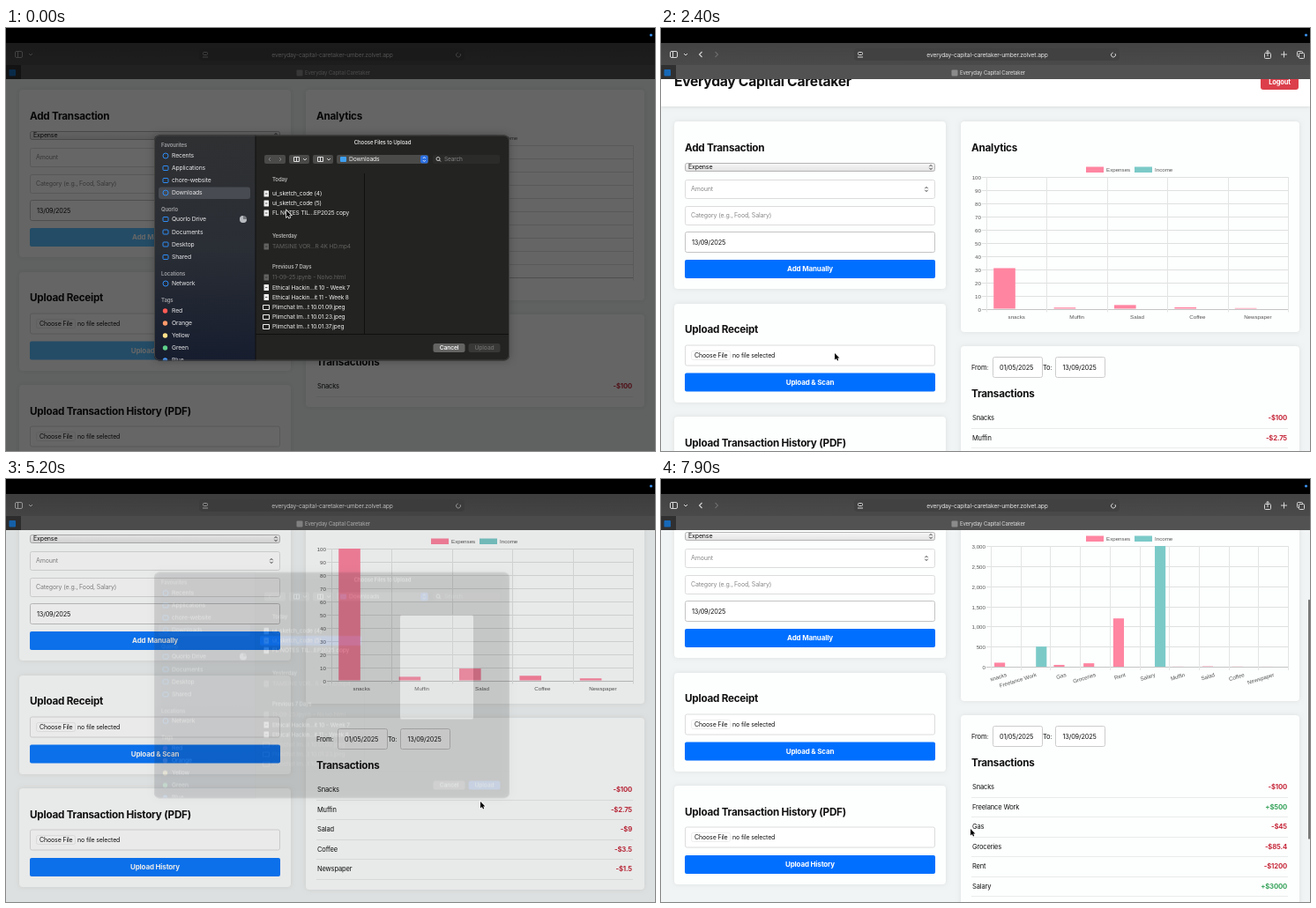
An HTML page with a canvas that plays this animation: 736x480 px, repeating every 8 s.

```html
<!DOCTYPE html>
<html lang="en">
<head>
<meta charset="utf-8">
<title>Budget page</title>
<style>
html, body { margin: 0; width: 100%; height: 100%; overflow: hidden; background: #000; }
canvas { display: block; }
</style>
</head>
<body>
<canvas id="stage" width="736" height="480"></canvas>
<script>
const W = 736, H = 480, LOOP = 8000;
const APP = 'Everyday Capital Caretaker';
const PINK = '#ff85a1', TEAL = '#7bcac8', MAC = '#2f8cf5';
const stage = document.getElementById('stage').getContext('2d');
const sheet = Object.assign(document.createElement('canvas'), { width: W, height: H }).getContext('2d');
let g = stage, accent;

// Data
const first = [['snacks', -100]];
const scanned = [['Muffin', -2.75], ['Salad', -9], ['Coffee', -3.5], ['Newspaper', -1.5]];
const history = [['Freelance Work', 500], ['Gas', -45], ['Groceries', -85.4], ['Rent', -1200], ['Salary', 3000]];
const phases = [
  { start: -2000, rows: first, x0: 369, base: 282.5, max: 100, step: 10 },
  { start: 2357, rows: [...first, ...scanned], x0: 369, base: 282.5, max: 100, step: 10 },
  { start: 6300, rows: [...first, ...history, ...scanned], x0: 374, base: 270, max: 3000, step: 500 }
];
const files = [
  [188, 'ui_sketch_code (4)'], [199, 'ui_sketch_code (5)'], [210, 'FL NOTES TIL...EP2025 copy'],
  [248, 'TAMSINE VOR...R 4K HD.mp4', 'off'], [283, '11-09-25.ipynb - Nolvo.html', 'off'],
  [294.5, 'Ethical Hackin...it 10 - Week 7'], [305.5, 'Ethical Hackin...it 11 - Week 8'],
  [317, 'Plimchat Im...t 10.01.09.jpeg', 'img'], [328, 'Plimchat Im...t 10.01.23.jpeg', 'img'],
  [339, 'Plimchat Im...t 10.01.37.jpeg', 'img']
];
const places = [
  [145, 'Recents', 'round'], [159, 'Applications'], [173, 'chore-website'], [187, 'Downloads', 'round'],
  [217, 'Quorlo Drive'], [231.5, 'Documents'], [245.5, 'Desktop'], [260, 'Shared'], [290, 'Network', 'round']
];
const tags = [['Red', '#ff5a55'], ['Orange', '#ff9a6a'], ['Yellow', '#ffe08a'], ['Green', '#5fd08a'], ['Blue', '#4a9cff']];

// Motion: [time, values...]
const pointerPath = [
  [0, 318, 207], [300, 318, 185], [430, 318, 185], [780, 534, 364], [1050, 534, 364], [1850, 162, 368],
  [2150, 162, 368], [2350, 197, 369], [2900, 197, 369], [3600, 62, 409], [3950, 62, 409], [4300, 318, 196],
  [4500, 318, 196], [4950, 538, 366], [5400, 538, 366], [5900, 168, 436], [6250, 168, 436],
  [6900, 351, 372], [7100, 351, 372], [7900, 351, 397]
];
const scrollPath = [
  [0, 0], [2080, 0], [2340, 36], [2800, 36], [3550, -54], [6450, -54], [6950, 35], [7000, 35], [7900, -57]
];

const clamp = v => Math.max(0, Math.min(1, v));
function track(keys, t) {
  const i = keys.findIndex(k => k[0] > t);
  if (i < 0) return keys[keys.length - 1];
  const a = keys[i - 1], b = keys[i], u = (t - a[0]) / (b[0] - a[0]);
  return a.map((v, j) => v + (b[j] - v) * u * u * (3 - 2 * u));
}

// Drawing helpers
function text(s, x, y, size, color = '#111', { weight = 400, align = 'left', family = 'Inter' } = {}) {
  g.font = `${weight} ${size}px ${family}, sans-serif`;
  g.letterSpacing = family === 'Inter' ? -0.02 * size + 'px' : '0px';
  g.textAlign = align;
  g.textBaseline = 'middle';
  g.fillStyle = color;
  g.fillText(s, x, y + 0.3);
}
const plain = (s, x, y, align) => text(s, x, y, 6.2, '#555', { align, family: 'Liberation Sans' });
function box(x, y, w, h, fill, r = 0, border) {
  g.beginPath();
  g.roundRect(x, y, w, h, r);
  if (fill) { g.fillStyle = fill; g.fill(); }
  if (border) { g.strokeStyle = border; g.lineWidth = 1; g.stroke(); }
}
function line(color, width, ...p) {
  g.beginPath();
  for (let i = 0; i < p.length; i += 2) g.lineTo(p[i], p[i + 1]);
  g.strokeStyle = color;
  g.lineWidth = width;
  g.stroke();
}
function dot(x, y, r, color, from = 0, to = 7) {
  g.beginPath();
  g.moveTo(x, y);
  g.arc(x, y, r, from, to);
  g.fillStyle = color;
  g.fill();
}
function ring(x, y, r, color, from = 0, to = 7) {
  g.beginPath();
  g.arc(x, y, r, from, to);
  g.strokeStyle = color;
  g.lineWidth = 1;
  g.stroke();
}
function card(x, y, w, h) {
  g.shadowColor = 'rgba(0,0,0,.08)';
  g.shadowBlur = 5;
  box(x, y, w, h, '#fdfefe', 4);
  g.shadowBlur = 0;
  g.shadowColor = 'transparent';
}
const field = (x, y, w, h, border = '#dcdcdc') => box(x + .5, y + .5, w - 1, h - 1, '#fff', 2, border);
const heading = (s, x, y) => text(s, x, y, 11.7, '#111', { weight: 700 });
function button(s, y) {
  box(27, y, 284, 21, accent, 2);
  text(s, 169, y + 10.5, 8, '#fff', { weight: 700, align: 'center' });
}
function stepper(x, y) {
  line('#333', .9, x - 1.6, y - .8, x, y - 2.6, x + 1.6, y - .8);
  line('#333', .9, x - 1.6, y + .8, x, y + 2.6, x + 1.6, y + .8);
}
function filePicker(y, name) {
  field(27, y - 12, 284, 24);
  box(34.5, y - 5, 44, 10, '#fff', 2, '#eee');
  text('Choose File', 38, y, 7);
  if (name) box(85, y - 2.5, 4, 5, '#777');
  text(name || 'no file selected', name ? 94 : 81, y, 7);
}

function drawChart(phase, t) {
  const { rows, x0, base, max, step } = phase, top = 133, right = 711, n = rows.length;
  const grow = 1 - (1 - clamp((t - phase.start) / 500)) ** 4;
  const slot = (right - x0) / n, height = base - top;
  box(482, 121.5, 20, 6.5, PINK);
  plain('Expenses', 505, 125);
  box(537, 121.5, 20, 6.5, TEAL);
  plain('Income', 560, 125);
  for (let v = 0; v <= max; v += step) {
    const y = Math.round(base - v / max * height) + .5;
    line(v ? '#dfe0e0' : '#c4c4c4', 1, x0 - 5, y, right, y);
    plain(v.toLocaleString('en-US'), x0 - 6, y, 'right');
  }
  for (let i = 0; i <= n; i++) {
    const x = Math.round(x0 + i * slot) + .5;
    line('#e3e4e4', 1, x, top, x, base + 4);
  }
  rows.forEach(([name, v], i) => {
    const mid = x0 + (i + .5) * slot, h = Math.abs(v) / max * height * grow;
    box(v < 0 ? mid - slot * .38 : mid + slot * .02, base - h, slot * .36, h, v < 0 ? PINK : TEAL);
    if (n < 8) return plain(name, mid, base + 9.5, 'center');
    g.save();
    g.translate(mid + 1, base + 9);
    g.rotate(-.3);
    plain(name, 0, 0, 'right');
    g.restore();
  });
}

function drawPage(t) {
  const phase = phases.findLast(p => t >= p.start), scroll = track(scrollPath, t)[1];
  const rows = phase.rows;
  g.save();
  g.beginPath();
  g.rect(0, 58, W, H - 58);
  g.clip();
  box(0, 58, W, H, '#f1f4f4');
  g.translate(0, scroll);

  g.shadowColor = 'rgba(0,0,0,.15)';
  g.shadowBlur = 4;
  box(0, -20, W, 73, '#fff');
  g.shadowBlur = 0;
  text(APP, 15, 25, 15.7, '#111', { weight: 700 });
  box(680, 17, 43, 17, '#dc3f4b', 3);
  text('Logout', 701.5, 25.5, 7.5, '#fff', { weight: 700, align: 'center' });

  card(15, 70, 308, 190);
  heading('Add Transaction', 27, 100);
  const shade = g.createLinearGradient(0, 117, 0, 127);
  shade.addColorStop(0, '#f8f8f8');
  shade.addColorStop(1, '#e2e2e2');
  box(27.5, 117.5, 283, 9, shade, 2, '#b4b4b4');
  text('Expense', 31, 122, 7);
  stepper(306, 122);
  field(27, 136, 284, 22);
  text('Amount', 34, 147, 7, '#888');
  stepper(301, 147);
  field(27, 166, 284, 22);
  text('Category (e.g., Food, Salary)', 34, 177, 7, '#888');
  field(27, 195, 284, 24, '#c4c4c4');
  text('13/09/2025', 35, 207.5, 7.3);
  button('Add Manually', 227);

  card(15, 277, 308, 112);
  heading('Upload Receipt', 27, 306.5);
  filePicker(335.5, t > 850 && t < 2250 && 'ui_sketch_code (4)');
  button('Upload & Scan', 355.5);

  card(15, 405, 308, 112);
  heading('Upload Transaction History (PDF)', 27, 435);
  filePicker(463.5, t > 5250 && t < 6300 && 'ui_sketch_code (5)');
  button('Upload History', 484);

  card(340, 70, 384, 239);
  heading('Analytics', 352, 100);
  drawChart(phase, t);

  card(340, 325, 384, 105 + 22.5 * (rows.length - 1));
  text('From:', 352, 349, 7.5);
  field(376, 337, 57, 24, '#ccc');
  text('01/05/2025', 384, 349.5, 7.3);
  text('To:', 433, 349, 7.5);
  field(447, 337, 57, 24, '#ccc');
  text('13/09/2025', 455.5, 349.5, 7.3);
  heading('Transactions', 352, 379);
  rows.forEach(([name, v], i) => {
    const y = 406.5 + i * 22.5;
    text(name[0].toUpperCase() + name.slice(1), 353, y, 7.5);
    text(`${v < 0 ? '-' : '+'}$${Math.abs(v)}`, 710, y, 7.7, v < 0 ? '#c6283a' : '#36a35a',
      { weight: 700, align: 'right' });
    line('#eaecec', 1, 352, Math.round(y + 11) + .5, 711, Math.round(y + 11) + .5);
  });
  g.restore();
  if (t > 6450) box(734, 75 + (35 - scroll) * .67, 2, 272, '#777', 1);
}

function drawBrowser(focused) {
  box(0, 0, W, 17, '#000');
  dot(731.5, 8, 1.6, '#3a8ee8');
  const bar = g.createLinearGradient(0, 17, 0, 42);
  bar.addColorStop(0, '#434344');
  bar.addColorStop(1, '#4a4a4b');
  box(0, 17, W, 25, bar);
  box(219, 23, 301, 14, '#414142', 4);
  box(0, 42, W, 16, '#525253');
  box(0, 42, 17, 16, '#303031');
  box(3.5, 47, 7.5, 7.5, '#1769b8', 1);
  const ink = focused ? '#d8d8d8' : '#a2a2a2';
  box(10.5, 26.5, 8, 7, null, 1.5, ink);
  line(ink, 1, 13.5, 27, 13.5, 33);
  line(ink, 1, 26, 29, 28, 31, 30, 29);
  box(223.5, 27.5, 5, 3, null, 1, ink);
  line(ink, 1, 223, 33, 229, 33);
  text('everyday-capital-caretaker-umber.zolvet.app', 370, 30.5, 6.7, focused ? '#e4e4e4' : '#ccc', { align: 'center' });
  ring(513, 30.5, 2.5, ink, -.6, 4.6);
  box(329.5, 47.5, 7, 7, '#8b8b8c', 1);
  text(APP, 339, 51, 6, focused ? '#ddd' : '#bbb');
  if (!focused) return;
  line(ink, 1.1, 46.5, 27, 43.5, 30, 46.5, 33);
  line('#6c6c6c', 1.1, 61.5, 27, 64.5, 30, 61.5, 33);
  box(684.5, 28.5, 7, 6, null, 1, ink);
  line(ink, 1, 688, 32, 688, 25.5);
  line(ink, 1, 686, 27.5, 688, 25.5, 690, 27.5);
  line(ink, 1, 703, 30, 710, 30);
  line(ink, 1, 706.5, 26.5, 706.5, 33.5);
  box(721.5, 26.5, 6, 6, null, 1, ink);
  box(723.5, 28.5, 6, 6, '#484849', 1, ink);
}

function drawSheet(active, imagesOff, picked) {
  g.clearRect(0, 0, W, H);
  g.save();
  g.beginPath();
  g.roundRect(168, 121.5, 403, 256, 6);
  g.clip();
  box(168, 121, 403, 257, '#232321');
  const side = g.createLinearGradient(0, 122, 0, 377);
  side.addColorStop(0, '#2f3032');
  side.addColorStop(.5, '#2a2e35');
  side.addColorStop(1, '#161d2e');
  box(168, 121, 115, 257, side);
  box(173, 180.5, 104, 13.5, active ? '#484b51' : '#39465c', 3);

  g.globalAlpha = active ? 1 : .45;
  for (const [y, s] of [[133, 'Favourites'], [206, 'Quorlo'], [279, 'Locations'], [309, 'Tags']])
    text(s, 176, y, 6, '#a0a1a4', { weight: 600 });
  for (const [y, s, shape] of places) {
    if (shape) ring(181, y, 3, MAC);
    else box(178, y - 2.5, 6, 5, null, 1, MAC);
    text(s, 188, y, 6.8, '#e6e6e8');
  }
  tags.forEach(([s, color], i) => {
    dot(180.5, 321 + i * 14, 2.7, color);
    text(s, 188, 321 + i * 14, 6.8, '#e6e6e8');
  });
  g.globalAlpha = 1;
  dot(269, 217, 4, active ? '#777b80' : '#ddd');
  if (active) dot(269, 217, 4, '#b8bbc0', 0, 4.7);

  line('#101010', 1, 283, 121, 283, 378);
  text('Choose Files to Upload', 427, 130, 6.1, '#eee', { weight: 500, align: 'center' });
  box(293, 144, 24, 10, '#4a4a49', 2);
  line('#888', .9, 300, 147, 298, 149, 300, 151);
  line('#888', .9, 310, 147, 312, 149, 310, 151);
  for (const x of [321, 348]) {
    box(x, 144, 23, 10, '#4a4a49', 2);
    box(x + 5.5, 146.5, 6, 5, null, 0, '#ddd');
    line('#ddd', 1, x + 8.5, 146.5, x + 8.5, 151.5);
    line('#ddd', .9, x + 16, 148, x + 18, 150, x + 20, 148);
  }
  box(375, 144, 104, 10, '#4a4a49', 2);
  box(379, 146, 7, 6, '#3fa0f0', 1);
  text('Downloads', 389, 149, 6.8, '#eee');
  if (active) box(470, 144.5, 8.5, 9, '#2b6fe0', 2);
  line('#fff', .8, 472.8, 148, 474.3, 146.5, 475.8, 148);
  line('#fff', .8, 472.8, 150, 474.3, 151.5, 475.8, 150);
  box(484, 144, 76, 10, '#2b2b2a', 2);
  ring(490, 148.5, 2, '#ccc');
  line('#ccc', 1, 491.5, 150, 493, 151.5);
  text('Search', 497, 149, 6.5, '#858585');

  for (const [y, s] of [[172, 'Today'], [236, 'Yesterday'], [271, 'Previous 7 Days']])
    text(s, 302, y, 6, '#b4b4b4', { weight: 600 });
  files.forEach(([y, s, kind], i) => {
    const off = kind === 'off' || kind === 'img' && imagesOff, ink = off ? '#626260' : '#f0f0f0';
    if (i === picked) box(288, y - 5.5, 115, 11, '#2a62d0', 2);
    if (kind === 'img') box(291.5, y - 2.5, 7, 5, null, 0, ink);
    else {
      box(292.5, y - 3.5, 5.5, 7, ink, .5);
      line('#232321', .7, 294, y, 296.5, y);
    }
    text(s, 302, y, 6.6, ink);
  });
  line('#101010', 1, 406.5, 165, 406.5, 347);
  line('#101010', 1, 283, 347.5, 571, 347.5);
  const ready = picked >= 0;
  if (ready) box(447, 170, 83, 118, '#fff', 2);
  box(484.5, 358, 36, 10, '#646463', 2.5);
  text('Cancel', 502.5, 363, 6.8, '#fff', { weight: 500, align: 'center' });
  box(524.5, 358, 36, 10, ready ? '#2b6fe0' : '#383837', 2.5);
  text('Upload', 542.5, 363, 6.8, ready ? '#fff' : '#777', { align: 'center' });
  g.restore();
  box(168.5, 122, 402, 255, null, 6, '#434342');
}

function drawPointer(x, y) {
  g.beginPath();
  for (const [dx, dy] of [[0, 0], [0, 7.5], [1.8, 6], [3, 8.6], [4.2, 8], [3.1, 5.5], [5.4, 5.4]])
    g.lineTo(x + dx, y + dy);
  g.closePath();
  g.strokeStyle = '#fff';
  g.lineWidth = 1.4;
  g.stroke();
  g.fillStyle = '#000';
  g.fill();
}

function draw(t) {
  const second = t > 2000;
  const open = second
    ? clamp((t - 3720) / 160) * clamp((5225 - t) / 175)
    : clamp((960 - t) / 160);
  // Buttons pale a little behind the open sheet
  accent = `rgb(${90 * open}, ${111 + 79 * open}, 255)`;
  g = stage;
  drawPage(t);
  drawBrowser(!open);
  if (open) {
    const picked = second ? (t > 4350 ? 1 : -1) : (t > 350 ? 0 : -1);
    box(0, 17, W, H - 17, `rgba(0,0,0,${.6 * open})`);
    g = sheet;
    drawSheet(!second || t >= 3980, second, picked);
    g = stage;
    g.globalAlpha = open;
    g.shadowColor = 'rgba(0,0,0,.25)';
    g.shadowBlur = 10;
    g.drawImage(sheet.canvas, 0, -18 * (1 - open));
    g.globalAlpha = 1;
    g.shadowBlur = 0;
    g.shadowColor = 'transparent';
  }
  const [, x, y] = track(pointerPath, t);
  drawPointer(x, y);
}

function tick() {
  draw(performance.now() % LOOP);
  requestAnimationFrame(tick);
}
tick();
</script>
</body>
</html>
```
